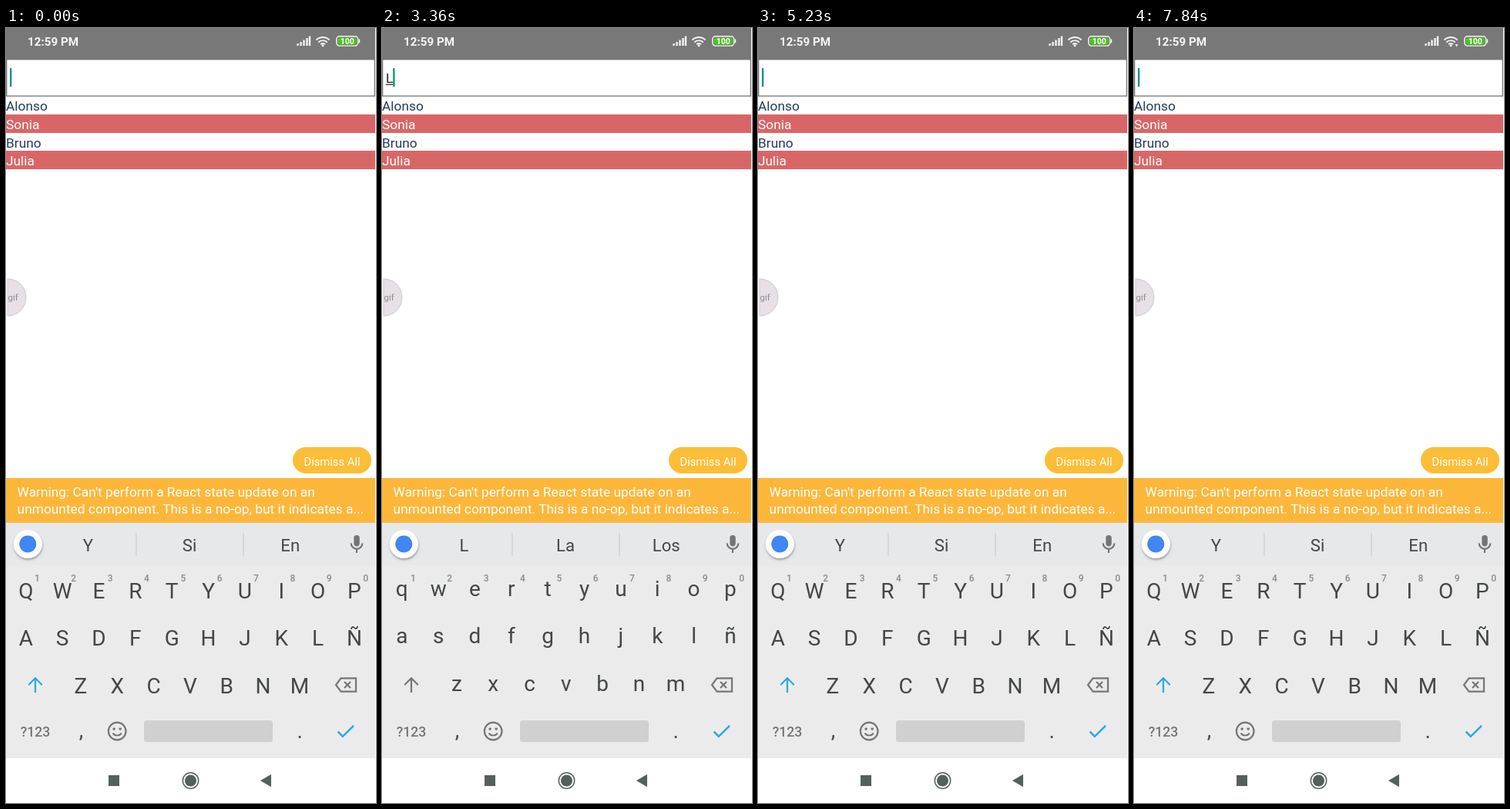
An HTML page for the animation above (8 s loop, 480 by 1004 pixels).

```html
<!DOCTYPE html>
<html lang="es">
<head>
<meta charset="utf-8">
<title>Filtered list</title>
<style>
  html, body { margin: 0; width: 100%; height: 100%; overflow: hidden; background: #fff; }
  svg { display: block; width: 100%; height: 100%; font-family: Roboto, sans-serif; }
  .mid { text-anchor: middle; }
  .body { font-size: 17.33px; }
  .key { font-size: 28px; fill: #434746; }
  .hint { font-size: 12px; font-weight: 500; fill: #8a8a8a; }
  .word { font-size: 22.2px; fill: #434746; }
  .line { fill: none; stroke: #757575; stroke-width: 2.2; }
  #list rect { shape-rendering: crispEdges; }
</style>
</head>
<body>
<svg id="stage" viewBox="0 0 480 1004" xmlns="http://www.w3.org/2000/svg">
  <defs>
    <filter id="shadow" x="-30%" y="-30%" width="160%" height="160%">
      <feDropShadow dx="0.5" dy="2" stdDeviation="1.8" flood-opacity=".35"/>
    </filter>
  </defs>
  <rect width="480" height="1004" fill="#fff"/>

  <g id="status">
    <rect width="479" height="40.5" fill="#787878"/>
    <text x="28" y="22.5" font-size="15.2" font-weight="700" fill="#f6f6f6">12:59 PM</text>
    <path d="M378.5 23v-3M382.5 23v-5M386.5 23v-7.5M390.5 23v-10M394 23v-12.5" stroke="#f4f4f4" stroke-width="2.4"/>
    <g fill="none" stroke="#f4f4f4" stroke-width="1.9">
      <path d="M402.5 15.5a12 12 0 0 1 17 0M405.3 18.5a8 8 0 0 1 11.4 0M408 21.2a4.2 4.2 0 0 1 6 0"/>
    </g>
    <circle cx="411" cy="22.8" r="1.5" fill="#f4f4f4"/>
    <path id="traffic" d="M416.5 21h4l-2 3.6z" fill="#e8e8e8"/>
    <rect x="428.7" y="10.7" width="28" height="12.4" rx="4" fill="#787878" stroke="#f4f4f4" stroke-width="1.4"/>
    <rect x="430.4" y="12.4" width="24.6" height="9" rx="2.5" fill="#4cc31c"/>
    <path d="M458.4 14.5v5" stroke="#f4f4f4" stroke-width="1.5"/>
    <text class="mid" x="442.7" y="20.8" font-size="10.5" font-weight="700" fill="#fff">100</text>
  </g>

  <g id="field">
    <rect x=".7" y="40.7" width="477.6" height="47.4" fill="#fff" stroke="#747474" stroke-width="1.3"/>
    <text id="typed" class="body" x="5" y="71" fill="#222"/>
    <path id="underline" stroke="#222" stroke-width="1.2"/>
    <rect id="caret" y="52" width="2.4" height="24"/>
  </g>

  <g id="list"></g>

  <path d="M2 325a24 24 0 0 1 0 48z" fill="#e7e0e6" stroke="#c9c9c9"/>
  <text x="2.5" y="352.5" font-size="11.5" fill="#8c8c8c">gif</text>

  <rect x="372" y="543" width="102" height="34" rx="17" fill="#fcbd37"/>
  <text class="mid" x="423" y="566.5" font-size="14.75" fill="#fff">Dismiss All</text>
  <rect y="583" width="479" height="58" fill="#fcb73b"/>
  <g class="body" fill="#fff">
    <text x="14.6" y="607">Warning: Can't perform a React state update on an</text>
    <text x="14.6" y="628.5">unmounted component. This is a no-op, but it indicates a...</text>
  </g>

  <rect y="641" width="479" height="305" fill="#ebebeb"/>
  <rect y="641" width="479" height="55" fill="#e6e8e9"/>
  <circle cx="28.3" cy="668.5" r="18.5" fill="#fff" filter="url(#shadow)"/>
  <circle cx="28.3" cy="668.5" r="11" fill="#4285f4"/>
  <path d="M169 654v30M308 654v30" stroke="#cdd2d4" stroke-width="1.4"/>
  <g id="words"></g>
  <rect x="451.3" y="657" width="7.4" height="14.5" rx="3.7" fill="#757575"/>
  <path class="line" d="M447.7 667.5a7.3 7.3 0 0 0 14.6 0M455 675v5"/>

  <rect id="pressed" x="407.5" y="826" width="66.5" height="50" rx="5" fill="#cacaca"/>
  <g id="keys"></g>
  <path id="shift" class="line" d="M38 861v-18M29.3 851l8.7-8.7 8.7 8.7"/>
  <path class="line" d="M434.5 842.3H454v17.4H434.5L428 851zM439 847l8 8M447 847l-8 8"/>
  <text class="mid" x="38" y="917.5" font-size="17.6" font-weight="500" fill="#757575">?123</text>
  <text class="key mid" x="97.5" y="918.5">,</text>
  <circle class="line" cx="144.2" cy="911" r="11.3"/>
  <circle cx="140.2" cy="908" r="1.8" fill="#757575"/>
  <circle cx="148.2" cy="908" r="1.8" fill="#757575"/>
  <path class="line" d="M138.7 913.5a6 5 0 0 0 11 0"/>
  <rect x="179" y="897" width="167" height="28" rx="3.5" fill="#d0d0d0"/>
  <text class="key mid" x="381.3" y="920">.</text>
  <path d="M430.5 911.5l6.3 6.3L451 903.8" fill="none" stroke="#2ba6e0" stroke-width="2.5"/>

  <g id="popup">
    <rect x="-23.3" y="678" width="46.8" height="136" rx="5" fill="#fff" filter="url(#shadow)"/>
    <text id="big" class="mid" x="-.5" y="725" font-size="36" fill="#434746"/>
    <path id="more" d="M7 738.5h2.2M11 738.5h2.2M15 738.5h2.2" stroke="#434746" stroke-width="2.2"/>
  </g>

  <g fill="#55605b">
    <rect x="133" y="968" width="14" height="14"/>
    <circle cx="239.5" cy="975" r="7.6"/>
    <circle cx="239.5" cy="975" r="10.2" fill="none" stroke="#55605b" stroke-width="1.5"/>
    <path d="M330 975l14-8.2v16.4z"/>
  </g>
</svg>
<script>
const LOOP = 8000;
const NAMES = ["Alonso", "Sonia", "Bruno", "Julia"];
const WORDS = { "": ["Y", "Si", "En"], L: ["L", "La", "Los"], A: ["A", "Artículo", "Así"] };
const ADVANCE = { "": 0, L: 9.2, A: 10.8 };
const ROWS = [["QWERTYUIOP", 0, 739], ["ASDFGHJKLÑ", 0, 800], ["ZXCVBNM", 1.5, 862]];
const keyX = col => 25.8 + col * 47.35;

// Each step changes only the listed parts of the state.
const START = { caret: 1, text: "", filter: "", hints: "", upper: 1, popup: "", pressed: 0, traffic: 0 };
const STEPS = [
  [490, { caret: 0 }], [970, { caret: 1 }], [1460, { caret: 0 }],
  [1950, { caret: 1 }], [2430, { caret: 0 }],
  [2860, { popup: "L" }], [2920, { caret: 1 }], [3060, { text: "L" }],
  [3260, { popup: "", upper: 0 }], [3360, { hints: "L" }], [3390, { filter: "L" }],
  [3890, { caret: 0 }], [4380, { caret: 1 }],
  [4710, { pressed: 1 }], [4950, { caret: 0 }], [5050, { text: "", caret: 1 }],
  [5150, { pressed: 0, upper: 1 }], [5230, { hints: "", filter: "" }],
  [5420, { traffic: 1 }],
  [5730, { popup: "A" }], [5900, { text: "A" }], [5920, { upper: 0 }],
  [5950, { popup: "", hints: "A" }], [6050, { filter: "A" }],
  [6560, { caret: 0 }], [6630, { traffic: 0 }],
  [7030, { caret: 1 }], [7060, { pressed: 1 }], [7090, { text: "" }],
  [7290, { pressed: 0, upper: 1 }], [7360, { hints: "" }], [7440, { filter: "" }],
  [7840, { traffic: 1 }]
];

const $ = id => document.getElementById(id);
const set = (node, attrs) => {
  for (const name in attrs) node.setAttribute(name, attrs[name]);
  return node;
};
const add = (parent, tag, attrs, text = "") => {
  const node = set(document.createElementNS("http://www.w3.org/2000/svg", tag), attrs);
  node.textContent = text;
  parent.append(node);
  return node;
};
const show = (id, on) => set($(id), { visibility: on ? "visible" : "hidden" });

const keys = ROWS.flatMap(([letters, shift, y]) => [...letters].map((letter, i) => ({
  letter, y, node: add($("keys"), "text", { class: "key mid", x: keyX(i + shift) })
})));
for (let i = 0; i < 10; i++)
  add($("keys"), "text", { class: "hint mid", x: keyX(i) + 14.6, y: 716.5 }, (i + 1) % 10);
const words = [106.5, 238, 368.8].map(x => add($("words"), "text", { class: "word mid", x, y: 677.5 }));
const rows = NAMES.map((_, i) => {
  const top = 88.5 + i * 23.65;
  const g = add($("list"), "g", {});
  add(g, "rect", { y: top, width: 479, height: 23.65, fill: i % 2 ? "#d96667" : "#fff" });
  const label = add(g, "text", { class: "body", x: 0, y: top + 18.8, fill: i % 2 ? "#fff" : "#213c5e" });
  return { g, label };
});

function stateAt(t) {
  const state = { ...START };
  for (const [at, change] of STEPS) if (t >= at) Object.assign(state, change);
  return state;
}

function draw(s) {
  const end = 5 + ADVANCE[s.text];
  $("typed").textContent = s.text;
  set($("underline"), { d: s.text ? `M5 73.2H${end}` : "" });
  set($("caret"), { x: end, fill: s.text ? "#0f9a72" : "#1b8aa8" });
  show("caret", s.caret);
  show("traffic", s.traffic);
  show("pressed", s.pressed);

  const found = NAMES.filter(name => name.toUpperCase().includes(s.filter));
  rows.forEach(({ g, label }, i) => {
    set(g, { visibility: found[i] ? "visible" : "hidden" });
    label.textContent = found[i] || "";
  });

  words.forEach((node, i) => { node.textContent = WORDS[s.hints][i]; });
  for (const { letter, y, node } of keys) {
    node.textContent = s.upper ? letter : letter.toLowerCase();
    set(node, { y: s.upper ? y : y - 3.4 });
  }
  $("shift").style.stroke = s.upper ? "#2ba6e0" : "#757575";

  set($("popup"), {
    display: s.popup ? "inline" : "none",
    transform: `translate(${keyX(s.popup === "L" ? 8 : 0) + .6} 0)`
  });
  $("big").textContent = s.popup;
  set($("more"), { display: s.popup === "A" ? "inline" : "none" });
}

let last = "";
function tick() {
  const state = stateAt(performance.now() % LOOP);
  const id = JSON.stringify(state);
  if (id !== last) draw(state);
  last = id;
  requestAnimationFrame(tick);
}
tick();
</script>
</body>
</html>
```
